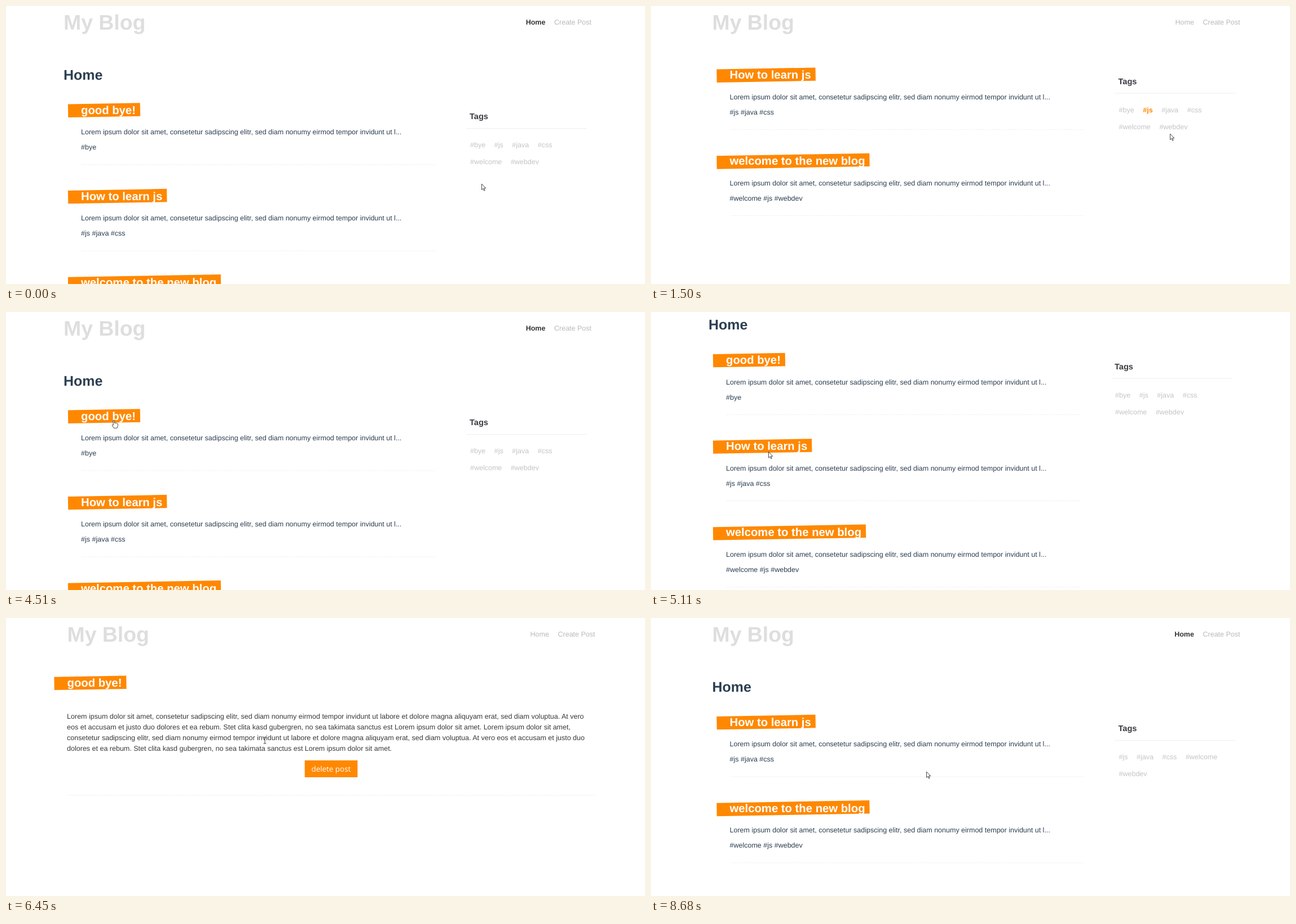
An HTML page for the animation above (8.75 s loop, 1133x494 px).

```html
<!DOCTYPE html>
<html lang="en">
<head>
<meta charset="utf-8">
<title>My Blog</title>
<style>
  html, body { margin: 0; width: 100%; height: 100%; overflow: hidden; background: #fff; }
  svg { display: block; width: 1133px; height: 494px; }
  text { font: 12.5px "Liberation Sans", Arial, sans-serif; fill: #2c3e50; text-rendering: geometricPrecision; }
  .logo { font-size: 37.4px; font-weight: bold; fill: #dedede; }
  .nav { fill: #b9b9b9; }
  .here { fill: #333; font-weight: bold; }
  .h1 { font-size: 24.95px; font-weight: bold; }
  .title { font-size: 20.3px; font-weight: bold; fill: #fff; }
  .side { font-size: 14.6px; font-weight: bold; fill: #3a3a42; }
  .tag { fill: #c4c4c4; }
  .on { fill: #ff8800; font-weight: bold; }
  .body { fill: #383838; }
  .btn { font: 13.4px "Open Sans", "Noto Sans", sans-serif; fill: #fff; }
  .bar { fill: #ff8800; }
  .dash { stroke: #eee; stroke-dasharray: 2.4 1.6; }
  .rule { stroke: #eee; }
  .end { text-anchor: end; }
  #cursor { pointer-events: none; stroke-linejoin: round; stroke-linecap: round; }
</style>
</head>
<body>
<svg viewBox="0 0 1133 494">
  <g id="pages"></g>
  <g id="cursor">
    <path id="arrow" d="M.5 .5V10.6L2.9 8.4L4.6 12.2L6.2 11.5L4.5 7.8H7.4Z" fill="#fff" stroke="#333" stroke-width=".9"/>
    <path id="hand" d="M-1 1.2Q0 -.3 1.1 1.2V5.3Q2.3 4.4 3.2 5.6Q4.6 4.9 5.3 6.2Q7 5.6 7.3 7.3V10.2L5.8 14.3H.2L-2.8 9.5Q-2.7 7.6 -1 8.8Z" fill="#fff" stroke="#333" stroke-width=".9"/>
    <path id="beam" d="M-2 -5.5H2M0 -5V5M-2 5.5H2" fill="none" stroke="#444"/>
  </g>
</svg>
<script>
const LOOP = 8750, STEP = 70;
const LEFT = 102, INDENT = 133, ROW = 153;
const NO_SCROLLBAR = 6.5, NO_HEADING = -62.4;
const lorem = "Lorem ipsum dolor sit amet, consetetur sadipscing elitr, sed diam nonumy eirmod tempor invidunt ut ";

const posts = {
  bye: { title: "good bye!", tags: "#bye" },
  learn: { title: "How to learn js", tags: "#js #java #css" },
  welcome: { title: "welcome to the new blog", tags: "#welcome #js #webdev" }
};

const pen = document.createElement("canvas").getContext("2d");
pen.font = 'bold 20.3px "Liberation Sans", Arial, sans-serif';

const text = (x, y, cls, str) => `<text x="${x}" y="${y}" class="${cls}">${str}</text>`;
const line = (x1, x2, y, cls) => `<line x1="${x1}" x2="${x2}" y1="${y}" y2="${y}" class="${cls}"/>`;
const rect = (x, y, w, h, extra = "") => `<rect x="${x}" y="${y}" width="${w}" height="${h}" class="bar" ${extra}/>`;
const shift = (x, y, html) => `<g transform="translate(${x} ${y})">${html}</g>`;

function banner(x, y, title) {
  const width = pen.measureText(title).width + 31;
  const left = x - 23;
  return rect(left, y - 18.4, width, 23.4, `transform="rotate(-1 ${left + width / 2} ${y - 6.7})"`)
    + text(x, y, "title link", title);
}

const header = home =>
  text(LEFT, 42, "logo", "My Blog")
  + text(956.4, 33, "end link " + (home ? "here" : "nav"), "Home")
  + text(972, 33, "nav link", "Create Post");

const entry = (post, i) => shift(0, i * ROW,
  banner(INDENT, 191.8, post.title)
  + text(INDENT, 228.4, "", lorem + "l...")
  + text(INDENT, 255.4, "", post.tags)
  + line(INDENT + 1, 760, 282, "dash"));

const tagRow = (row, i, active) => `<text x="823" y="${251.4 + i * 30}">` + row.split(" ").map((name, n) =>
  `<tspan dx="${n ? 15.6 : 0}" class="link ${name === active ? "on" : "tag"}">#${name}</tspan>`).join("") + "</text>";

const sidebar = (rows, active) =>
  text(822, 201.4, "side", "Tags")
  + line(816, 1030, 217.5, "rule")
  + rows.map((row, i) => tagRow(row, i, active)).join("");

function listing(names, rows, active) {
  const main = names.map((name, i) => entry(posts[name], i)).join("") + sidebar(rows, active);
  return header(!active) + (active ? shift(0, NO_HEADING, main) : text(LEFT, 131, "h1", "Home") + main);
}

function article(post) {
  const lines = [
    lorem + "labore et dolore magna aliquyam erat, sed diam voluptua. At vero",
    "eos et accusam et justo duo dolores et ea rebum. Stet clita kasd gubergren, no sea takimata sanctus est Lorem ipsum dolor sit amet. Lorem ipsum dolor sit amet,",
    "consetetur sadipscing elitr, sed diam nonumy eirmod tempor invidunt ut labore et dolore magna aliquyam erat, sed diam voluptua. At vero eos et accusam et justo duo",
    "dolores et ea rebum. Stet clita kasd gubergren, no sea takimata sanctus est Lorem ipsum dolor sit amet."
  ];
  return header(false)
    + banner(LEFT, 122, post.title)
    + lines.map((str, i) => text(LEFT - .4, 179.4 + i * 18.7, "body", str)).join("")
    + `<g class="link">${rect(523.2, 253, 93.6, 30)}${text(535, 273, "btn", "delete post")}</g>`
    + line(LEFT + 1, 1038, 315, "dash");
}

const allTags = ["bye js java css", "welcome webdev"];
const pages = [
  { at: 0, html: listing(["bye", "learn", "welcome"], allTags) },
  { at: 920, html: shift(NO_SCROLLBAR, 0, listing(["learn", "welcome"], allTags, "js")) },
  { at: 1910, html: shift(NO_SCROLLBAR, 0, listing(["welcome"], allTags, "welcome")) },
  { at: 3550, html: listing(["bye", "learn", "welcome"], allTags) },
  { at: 5700, html: shift(NO_SCROLLBAR, 0, article(posts.bye)) },
  { at: 8060, html: shift(NO_SCROLLBAR, 0, listing(["learn", "welcome"], ["js java css welcome", "webdev"])) }
];

const root = document.getElementById("pages");
root.innerHTML = pages.map(page => `<g>${page.html}</g>`).join("");

// Pointer moves: from the place before to (x, y), bowed sideways by bend.
const start = { x: 843, y: 316 };
const moves = [
  { from: 70, to: 780, x: 875, y: 243, bend: -30 },
  { from: 920, to: 1450, x: 920, y: 227, bend: 10 },
  { from: 1510, to: 1710, x: 857, y: 213, bend: 0 },
  { from: 2380, to: 3000, x: 863, y: 161, bend: -20 },
  { from: 3080, to: 3480, x: 948, y: 29, bend: 0 },
  { from: 3950, to: 4480, x: 191, y: 192, bend: 0 },
  { from: 4640, to: 4840, x: 208, y: 248.5, bend: 0 },
  { from: 6230, to: 6440, x: 459, y: 217.5, bend: -14 },
  { from: 6500, to: 6860, x: 579, y: 249, bend: 0 },
  { from: 7060, to: 7330, x: 597, y: 264, bend: 6 },
  { from: 7790, to: 7860, x: 604, y: 270, bend: 0 },
  { from: 8450, to: 8680, x: 488, y: 273, bend: 0 }
];

const clamp = v => Math.min(1, Math.max(0, v));
const smooth = k => k * k * (3 - 2 * k);

function pointer(t) {
  let a = start;
  for (const b of moves) {
    if (t < b.from) break;
    if (t < b.to) {
      const k = smooth((t - b.from) / (b.to - b.from));
      const dx = b.x - a.x, dy = b.y - a.y;
      const bow = b.bend * Math.sin(Math.PI * k) / Math.hypot(dx, dy);
      return { x: a.x + dx * k - dy * bow, y: a.y + dy * k + dx * bow };
    }
    a = b;
  }
  return a;
}

function scroll(t) {
  if (t < 5430) return 103 * (1 - (1 - clamp((t - 4840) / 400)) ** 3);
  return t < 5500 ? 93 : 0;
}

const cursor = document.getElementById("cursor");
const show = (el, on) => { el.style.display = on ? "" : "none"; };

function shapeAt({ x, y }) {
  const hit = document.elementFromPoint(x, y);
  if (hit && hit.closest(".link")) return "hand";
  return hit && hit.closest(".body") ? "beam" : "arrow";
}

function draw(t) {
  const current = pages.filter(page => page.at <= t).length - 1;
  [...root.children].forEach((el, i) => show(el, i === current));

  // The shape is read before scrolling: a wheel turn does not refresh it.
  const p = pointer(t - t % STEP);
  root.setAttribute("transform", "translate(0 0)");
  const shape = shapeAt(p);
  root.setAttribute("transform", `translate(0 ${-scroll(t)})`);

  cursor.setAttribute("transform", `translate(${p.x} ${p.y})`);
  for (const el of cursor.children) show(el, el.id === shape);
}

const begin = performance.now();
function tick() {
  draw((performance.now() - begin) % LOOP);
  requestAnimationFrame(tick);
}
draw(0);
requestAnimationFrame(tick);
</script>
</body>
</html>
```
